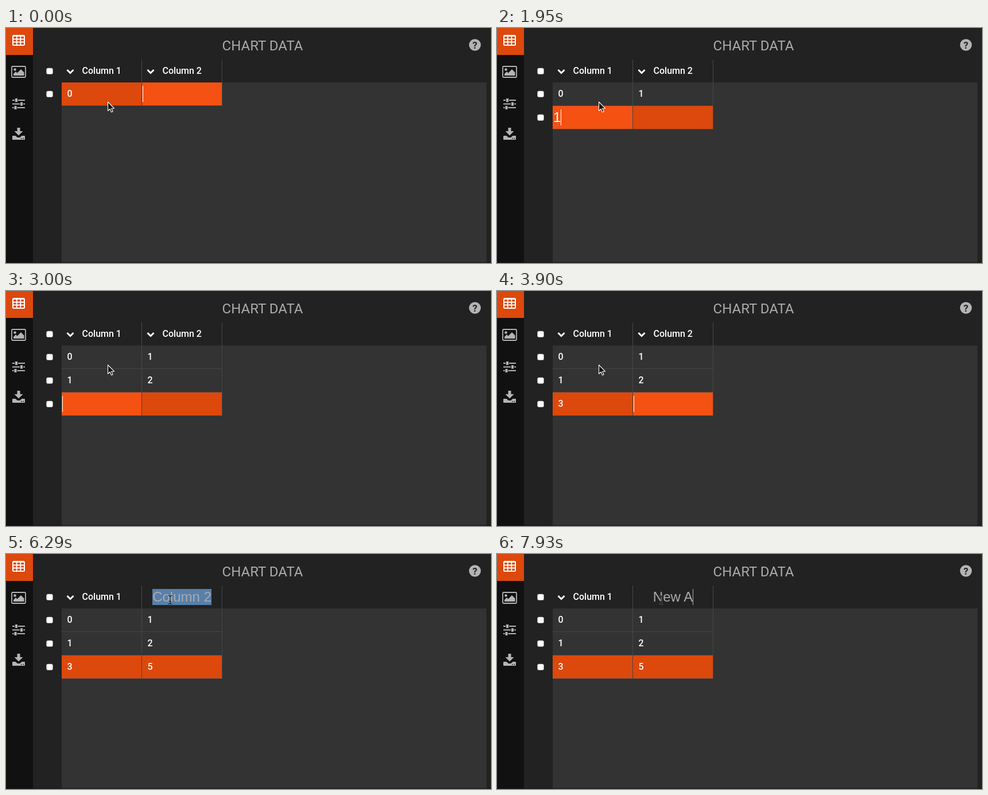
Write an HTML page that moves like this. It is 845 px wide and 410 px high and loops after 8 s.

```html
<!DOCTYPE html>
<html lang="en">
<head>
<meta charset="utf-8">
<title>Chart data</title>
<style>
  html, body { margin: 0; width: 100%; height: 100%; overflow: hidden; background: #222; }
  svg { display: block; width: 845px; height: 410px; }
  text { white-space: pre; }
  .title { font: 400 24px Roboto, sans-serif; fill: #aaa; text-anchor: middle; }
  .cell { font: 500 16px Roboto, sans-serif; fill: #fff; }
  .input { font: 400 24px "Liberation Sans", Arial, sans-serif; fill: #fff; }
  .help { font: 700 17px Roboto, sans-serif; fill: #222; text-anchor: middle; }
  .line { fill: #464646; }
  .icon { fill: #b4b4b4; }
  .chevron { fill: none; stroke: #fff; stroke-width: 3; }
</style>
</head>
<body>
<svg id="stage" viewBox="0 0 845 410">
  <rect width="845" height="410" fill="#222"/>
  <rect width="47" height="410" fill="#111"/>
  <rect width="47" height="47" fill="#dd480c"/>
  <rect x="97" y="95" width="740" height="315" fill="#333"/>
  <rect y="408" width="845" height="2" fill="#1e1216" opacity=".5"/>

  <g fill="none" stroke="#fff" stroke-width="2">
    <rect x="12" y="13" width="20" height="17" rx="1.5"/>
    <path d="M12 14h20M12 19.5h20M12 24.5h20M18.7 15v15M25.3 15v15" stroke-width="1.8"/>
  </g>
  <g class="icon">
    <rect x="10" y="67" width="24" height="19" rx="1.5" fill="none" stroke="#b4b4b4" stroke-width="1.8"/>
    <circle cx="15.5" cy="72.5" r="2.3"/>
    <path d="M13 83v-3l4-4 2.5 2.5 6.5-6.5 5.500 5.500v5.500z"/>
  </g>
  <g class="icon">
    <path d="M11 125h22v2h-22zM11 131.500h22v2h-22zM11 138h22v2h-22z"/>
    <g stroke="#111" stroke-width="1">
      <rect x="15.500" y="122.500" width="5" height="7" rx="1"/>
      <rect x="24.500" y="129" width="5" height="7" rx="1"/>
      <rect x="14" y="135.500" width="5" height="7" rx="1"/>
    </g>
  </g>
  <g class="icon">
    <path d="M19.500 174h5v6h5l-7.500 7.500-7.500-7.500h5z"/>
    <path d="M12 188h4.500l3.500 3h4l3.500-3h4.500q1 0 1 1v5q0 1-1 1h-20q-1 0-1-1v-5q0-1 1-1z"/>
    <path d="M26 192h1.500v1.500h-1.500zM29.500 192h1.500v1.500h-1.500z" fill="#111"/>
  </g>

  <text class="title" x="447" y="39">CHART DATA</text>
  <circle cx="817" cy="29.500" r="10.300" fill="#b4b4b4"/>
  <text class="help" x="817" y="35.500">?</text>
</svg>
<script>
const LOOP = 8000;
const HEADER = 2;
const DATA = [['0', '1'], ['1', '2'], ['3', '5']];
const COL_X = [97, 237];

// time, selected row, edited column (HEADER = second title), text, caret
const EDITS = [
  [0, 0, 1, '', 1], [450, 0, 1, '1', 1],
  [750, 1, 0, '', 1], [1350, 1, 0, '', 0], [1500, 1, 0, '2', 1], [1950, 1, 0, '1', 1],
  [2250, 1, 1, '', 1], [2550, 1, 1, '2', 1],
  [3000, 2, 0, '', 1], [3450, 2, 0, '', 0], [3600, 2, 0, '3', 1],
  [3900, 2, 1, '', 1], [4350, 2, 1, '5', 1], [4800, 2, 1, '5', 0],
  [5250, 2, 1, '5', 1], [5840, 2, 1, '5', 0],
  [6290, 2, HEADER, 'Column 2', 0],
  [7190, 2, HEADER, 'N', 1], [7340, 2, HEADER, 'Ne', 1], [7490, 2, HEADER, 'New', 1],
  [7790, 2, HEADER, 'New ', 1], [7930, 2, HEADER, 'New A', 1]
];

// time, x, y, text cursor
const POINTER = [
  [0, 177.5, 129, 0], [5100, 168, 126, 0], [5250, 152, 118, 0], [5400, 172, 104, 0],
  [5540, 224, 93, 0], [5690, 264.5, 87, 0], [5840, 278, 81, 0], [5990, 286, 80, 1]
];

const stage = document.getElementById('stage');

function add(tag, attrs, parent = stage) {
  const el = document.createElementNS('http://www.w3.org/2000/svg', tag);
  for (const key in attrs) el.setAttribute(key, attrs[key]);
  return parent.appendChild(el);
}
function box(x, y, width, height, attrs, parent) {
  return add('rect', { x, y, width, height, ...attrs }, parent);
}
function label(cls, x, y, content, parent) {
  const el = add('text', { class: cls, x, y }, parent);
  el.textContent = content;
  return el;
}
function set(el, attrs) {
  for (const key in attrs) el.setAttribute(key, attrs[key]);
}
function show(el, on) {
  el.style.display = on ? '' : 'none';
}
function checkbox(y, parent) {
  box(70.5, y - 5, 11, 10.5, { rx: 2.5, fill: '#fff', stroke: '#aaa', 'stroke-width': .6 }, parent);
}

checkbox(75);
const titles = COL_X.map((x, i) => {
  const g = add('g', {});
  add('path', { class: 'chevron', d: `M${x + 9.5} 73l5.500 5.500 5.500-5.500` }, g);
  label('cell', x + 35.5, 80, 'Column ' + (i + 1), g);
  box(x + 139, 55, 1, 40, { class: 'line' });
  return g;
});

const rowTop = r => 95 + 41 * r;
const rows = DATA.map((values, r) => {
  const g = add('g', {});
  const y = rowTop(r);
  checkbox(y + 20, g);
  const fills = COL_X.map(x => box(x, y, 139, 40, {}, g));
  COL_X.forEach(x => box(x + 139, y, 1, 41, { class: 'line' }, g));
  box(97, y + 40, 280, 1, { class: 'line' }, g);
  const texts = values.map((v, c) => label('cell', COL_X[c] + 9.5, y + 25, v, g));
  return { g, fills, texts };
});

const selection = box(255, 61, 103, 28, { fill: '#5780ab' });
const input = label('input', 0, 0, '');
const caret = box(0, 0, 1, 28, {});

const arrow = add('path', {
  d: 'M0 0v15.500l3.600-3.300 2.400 5.600 2.600-1.100-2.400-5.500h4.800z',
  fill: '#111', stroke: '#fff', 'stroke-width': 1.1, 'stroke-linejoin': 'round'
});
const beam = add('g', { fill: 'none' });
const beamPath = 'M-3.500-7.500q3 0 3.500 2 .5-2 3.500-2M0-5.500v11M-3.500 7.500q3 0 3.500-2 .5 2 3.500 2M-1.800 2.500h3.600';
add('path', { d: beamPath, stroke: '#ccc', 'stroke-width': 2.2, opacity: .5 }, beam);
add('path', { d: beamPath, stroke: '#111', 'stroke-width': 1.1 }, beam);

function drawEdit([, row, col, content, caretOn]) {
  const inHeader = col === HEADER;
  rows.forEach(({ g, fills, texts }, r) => {
    show(g, r <= row);
    fills.forEach((el, c) => set(el, {
      fill: r < row ? '#333' : c === col ? '#f45113' : '#dd480c'
    }));
    texts.forEach((el, c) => show(el, r < row || c < col));
  });
  show(titles[1], !inHeader);
  show(selection, inHeader && !caretOn);

  input.textContent = content;
  const width = content ? input.getComputedTextLength() : 0;
  const top = inHeader ? 61 : rowTop(row) + 6;
  const left = inHeader ? 306.5 - width / 2 : COL_X[col] + 1;
  const color = inHeader ? '#aaa' : '#fff';
  set(input, { x: left, y: top + 22, style: 'fill:' + color });
  set(caret, { x: Math.round(left + width), y: top, fill: color });
  show(caret, caretOn);
}

function drawPointer([, x, y, isText]) {
  const transform = `translate(${x} ${y})`;
  set(arrow, { transform });
  set(beam, { transform });
  show(arrow, !isText);
  show(beam, isText);
}

const current = (steps, t) => steps.findLast(step => step[0] <= t);
let lastEdit, lastPointer;

function frame(now) {
  const t = Math.max(0, now - start) % LOOP;
  const edit = current(EDITS, t);
  const pointer = current(POINTER, t);
  if (edit !== lastEdit) drawEdit(lastEdit = edit);
  if (pointer !== lastPointer) drawPointer(lastPointer = pointer);
  requestAnimationFrame(frame);
}
const start = performance.now();
frame(start);
</script>
</body>
</html>
```
